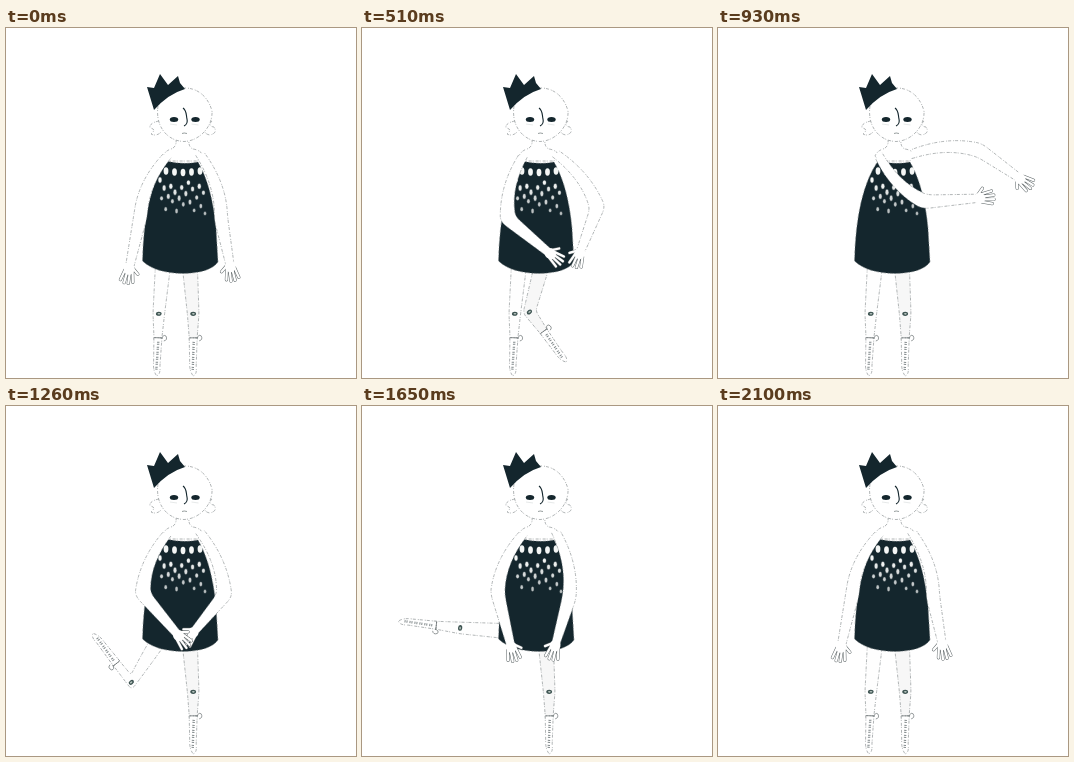
Recreate the animation shown at these times as an HTML page with a canvas. Size 350 by 350 pixels, loop 2.16 s.

```html
<!DOCTYPE html>
<html lang="en">
<head>
<meta charset="utf-8">
<title>Paper doll dance</title>
<style>
html, body { margin: 0; width: 100%; height: 100%; overflow: hidden; background: #fff; }
canvas { display: block; width: 350px; height: 350px; }
</style>
</head>
<body>
<canvas id="stage" width="350" height="350"></canvas>
<script>
const c = document.getElementById('stage').getContext('2d');
const LOOP = 2160, STEP = 30, DARK = '#14262d', LINE = '#7d8385';

// Joint angles in degrees: 0 points down, 90 points right.
const rest = { armL: -24, foreL: -12, armR: 18, foreR: 11, legL: -5, shinL: -2, legR: 4, shinR: 0 };
const pose = changes => ({ ...rest, ...changes });
const clasp = pose({ armL: -23, foreL: 31, armR: 7, foreR: -28, legR: -17, shinR: 43 });
const point = pose({ armL: 14.5, foreL: 90, armR: 94, foreR: 2, legR: -8.5, shinR: 17 });
const reach = pose({ armL: 45, foreL: 94, armR: 93, foreR: 55 });
const lower = pose({ armL: 15, foreL: 75, armR: 62, foreR: 8 });
const cross = pose({ armL: -22, foreL: 41, armR: 21, foreR: -40, legL: -33, shinL: -142 });
const kick = pose({ armL: -23, foreL: 15, armR: 11, foreR: -17, legL: -94, shinL: -98 });
const dance = [[0, rest], [300, clasp], [390, clasp], [690, point], [930, reach],
               [1050, lower], [1260, cross], [1640, kick], [2100, rest]];

// Monotone cubic through the poses, at rest on every turning point.
function angle(joint, t) {
  const time = i => dance[i][0], value = i => dance[i][1][joint];
  const slope = i => (value(i + 1) - value(i)) / (time(i + 1) - time(i));
  const tangent = i => {
    if (i === 0 || i === dance.length - 1) return 0;
    const a = slope(i - 1), b = slope(i);
    return a * b <= 0 ? 0 : 2 * a * b / (a + b);
  };
  let i = 0;
  while (i < dance.length - 2 && t > time(i + 1)) i++;
  const h = time(i + 1) - time(i), u = (t - time(i)) / h, v = 1 - u;
  const deg = value(i) * v * v * (1 + 2 * u) + value(i + 1) * u * u * (3 - 2 * u)
            + h * u * v * (v * tangent(i) - u * tangent(i + 1));
  return deg * Math.PI / 180;
}

const move = ([x, y], a, d) => [x + Math.sin(a) * d, y + Math.cos(a) * d];
const side = ([x, y], a, w) => [x + Math.cos(a) * w, y - Math.sin(a) * w];
const mix = (p, q, k) => [p[0] + (q[0] - p[0]) * k, p[1] + (q[1] - p[1]) * k];

function outline(path, fill) {
  c.fillStyle = fill;
  c.fill(path);
  c.strokeStyle = LINE;
  c.lineWidth = 0.6;
  c.setLineDash([3, 1, 1, 2]);
  c.stroke(path);
  c.setLineDash([]);
}

function oval(x, y, rx, ry, fill) {
  c.beginPath();
  c.ellipse(x, y, rx, ry, 0, 0, 7);
  c.fillStyle = fill;
  c.fill();
}

function ink(d, width = 0.8, color = DARK) {
  c.strokeStyle = color;
  c.lineWidth = width;
  c.stroke(new Path2D(d));
}

function within(p, a, sx, sy, draw) {
  c.save();
  c.translate(...p);
  c.rotate(-a);
  c.scale(sx, sy);
  draw();
  c.restore();
}

// Two tapered segments, the first bowed sideways; returns joint and end.
function limb(root, a, b, len, widths, bow, fill) {
  const mid = move(root, a, len[0]), end = move(mid, b, len[1]);
  const bend = side(mix(root, mid, 0.5), a, bow * 2);
  const miter = Math.min(1.3, 1 / Math.abs(Math.cos((a - b) / 2)));
  const edge = s => [
    side(root, a, s * widths[0]),
    side(bend, a, s * (widths[0] + widths[1]) / 2),
    side(mid, (a + b) / 2, s * widths[1] * miter),
    side(end, b, s * widths[2])
  ];
  const p = new Path2D(), [l0, l1, l2, l3] = edge(-1), [r0, r1, r2, r3] = edge(1);
  p.moveTo(...l0);
  p.quadraticCurveTo(...l1, ...mix(l2, l1, 0.15));
  p.quadraticCurveTo(...l2, ...mix(l2, l3, 0.15));
  p.lineTo(...l3);
  p.lineTo(...r3);
  p.lineTo(...mix(r2, r3, 0.15));
  p.quadraticCurveTo(...r2, ...mix(r2, r1, 0.15));
  p.quadraticCurveTo(...r1, ...r0);
  outline(p, fill);
  return [mid, end];
}

function arm(root, a, b, len, flip) {
  const [, wrist] = limb(root, a, b, len, [4.5, 6.8, 4.2], -5 * flip, '#fff');
  within(wrist, b, 1.2 * flip, 1.2, () => {
    const fingers = new Path2D('M3 2L8 6');
    for (let i = 0; i < 4; i++) {
      const x = i * 2.2 - 3.3;
      fingers.moveTo(x, 5);
      fingers.lineTo(x * 1.6, 16 - Math.abs(x) * 0.8);
    }
    c.lineCap = 'round';
    for (const [w, color] of [[2.7, '#5c6466'], [1.9, '#fff']]) {
      c.lineWidth = w;
      c.strokeStyle = color;
      c.stroke(fingers);
    }
    oval(0, 3, 4.4, 5, '#fff');
  });
}

function leg(root, a, b, fill) {
  const [knee] = limb(root, a, b, [60, 26], [8, 5.8, 3.8], 0, fill);
  within(knee, b, 1, 1, () => {
    oval(0, 0, 2.9, 2.1, '#3f5553');
    oval(0.2, 0, 1.4, 0.8, '#b9c6c0');
    outline(new Path2D('M-4 24L-3.5 48Q-4 57 0 62Q4 61 3 52L4 24Z'), '#fff');
    ink('M-3.5 24H4', 0.7, '#555d5f');
    ink('M4 25Q5 20 8 22Q10 26 6 27', 0.6, '#555d5f');
    c.setLineDash([1, 1, 1, 2]);
    ink('M0.5 28L-0.5 57', 2.4, '#80888a');
    c.setLineDash([]);
  });
}

function beads() {
  for (let i = 0; i < 5; i++) oval(160 + i * 8.5, 143 + Math.sin(i * Math.PI / 4) * 1.5, 2.4, 3.7, '#f4f6f5');
  let seed = 11;
  const random = () => (seed = seed * 16807 % 2147483647) / 2147483647;
  for (let i = 0; i < 22; i++) {
    const k = i / 22, x = 154 + (i * 0.618 % 1) * 46, y = 152 + k * 31 + random() * 4;
    const r = 1.6 - k * 0.5, tall = 1.3 + random() * 0.8;
    oval(x, y, r + 0.5, r * tall + 0.5, 'rgba(255,255,255,.25)');
    oval(x, y, r, r * tall, `rgba(245,247,246,${1 - k * 0.4})`);
  }
}

function body() {
  outline(new Path2D('M170 111Q171 119 165 121Q159 123 157 128L161 133H192L197 127Q194 122 187 121Q182 119 183 111'), '#fff');
  outline(new Path2D('M160 133Q177 137 192 134Q206 158 210 200L212 234Q204 245 177 245.5Q149 245 136.5 233Q138 165 160 133Z'), DARK);
  beads();
}

function head() {
  outline(new Path2D('M153 93Q143 95 144 100Q151 101 145 106Q151 109 156 103'), '#fff');
  outline(new Path2D('M206 93Q201 98 208 99Q212 105 204 107Q198 106 199 102'), '#fff');
  outline(new Path2D('M152 78C149 98 161 113 178 113.5C194 113 207 98 206 83C202 68 191 60 179 60C166 62 156 70 152 78Z'), '#fff');
  c.fillStyle = DARK;
  c.fill(new Path2D('M141 59L148 60L154 46L162 57L172 48L174 55L179 61Q162 66 148 82Z'));
  for (const x of [168, 189.5]) {
    oval(x, 91.5, 4.2, 2.5, DARK);
    ink(`M${x - 4} 96L${x + 3} 97`, 0.5, '#cdd2d2');
  }
  ink('M177 80C181 83 180 87 181 91C182 95 180 97 178 98', 1.1);
  ink('M176 105.5Q178 104.5 181 105.5', 0.9, '#8b9292');
}

function draw(t) {
  const q = {};
  for (const joint in rest) q[joint] = angle(joint, t);
  c.fillStyle = '#fff';
  c.fillRect(0, 0, 350, 350);
  leg([158, 226], q.legL, q.shinL, '#fefefe');
  leg([183, 226], q.legR, q.shinR, '#f7f7f7');
  body();
  arm([194, 126], q.armR, q.foreR, [68, 45], -1);
  arm([161, 128], q.armL, q.foreL, [65, 51], 1);
  head();
}

const start = performance.now();
function tick() {
  const t = (performance.now() - start) % LOOP;
  draw(Math.min(2100, Math.floor(t / STEP) * STEP));
  requestAnimationFrame(tick);
}
tick();
</script>
</body>
</html>
```
